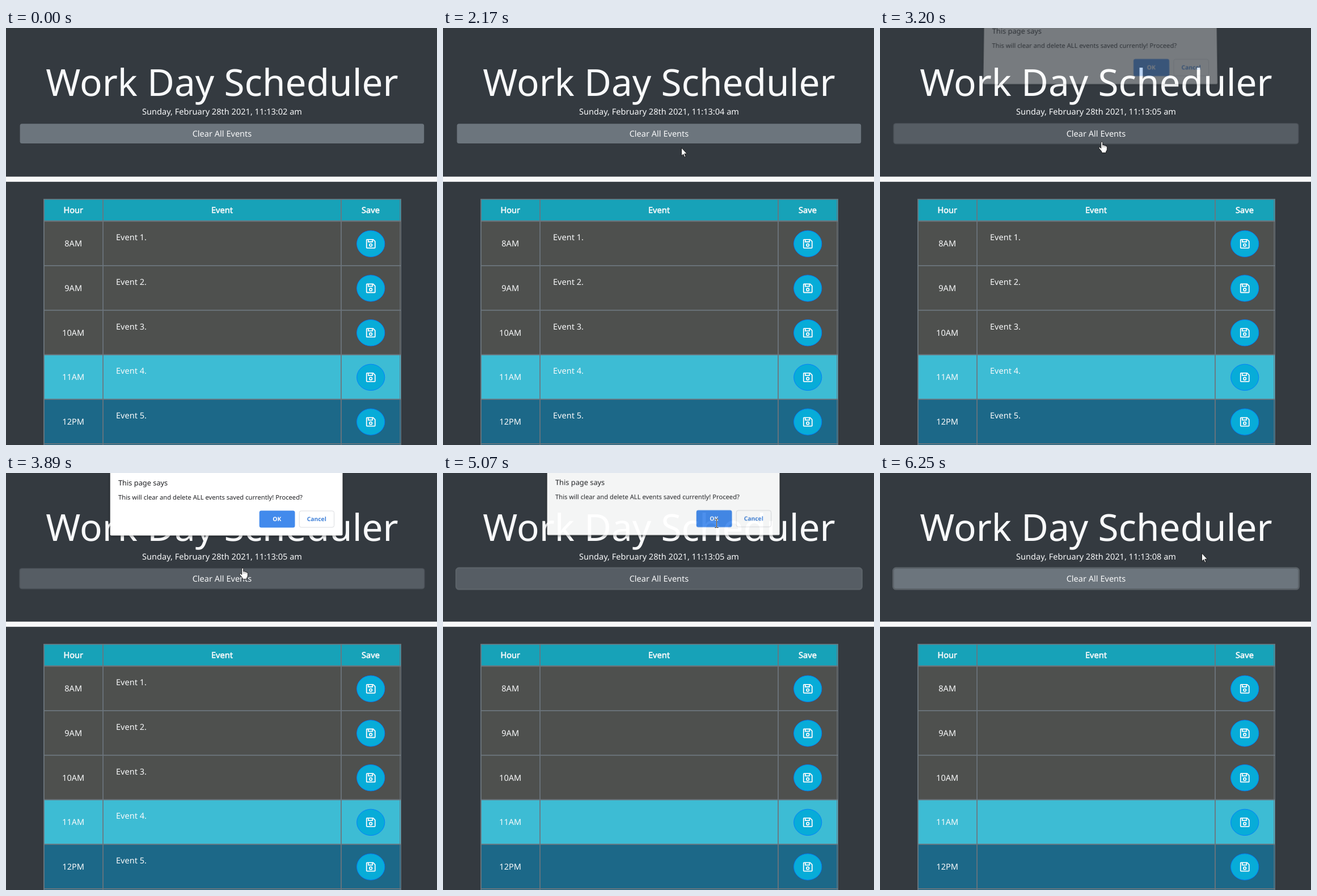
An HTML page that plays this animation: 760x737 px, repeating every 6330 ms.

```html
<!DOCTYPE html>
<html lang="en">
<head>
<meta charset="utf-8">
<title>Scheduler</title>
<style>
  html, body { margin: 0; width: 100%; height: 100%; overflow: hidden; background: #343a40; }
  #stage { position: absolute; inset: 0; overflow: hidden; background: #343a40; }
  svg { position: absolute; left: 0; top: 0; overflow: hidden; }
  text { font-family: "Noto Sans", "Open Sans", sans-serif; font-size: 14.57px; fill: #f8f9fa; text-rendering: geometricPrecision; }
  .mid { text-anchor: middle; }
  .head { stroke: #f8f9fa; stroke-width: .6px; }
  #dialog { transform-origin: 388.5px 0; filter: drop-shadow(0 1px 2px rgba(0, 0, 0, .5)); }
  #dialog text { fill: #202124; font-size: 11.2px; }
  #dialog .btn { font-size: 10.3px; font-weight: 600; text-anchor: middle; }
  #beam { mix-blend-mode: difference; }
</style>
</head>
<body>
<div id="stage">
<svg id="page" width="760" height="737">
  <text class="mid" x="381" y="119.8" style="font-size:65.7px">Work Day Scheduler</text>
  <text class="mid" id="clock" x="381" y="152.5"></text>
  <rect id="ring" fill="#5b6268"/>
  <rect id="clear" x="24.6" y="169.3" width="712.6" height="34.8" rx="3.6"/>
  <text class="mid" x="381" y="192.2">Clear All Events</text>
  <rect y="262.7" width="760" height="9.1" fill="#f8f9fa"/>
  <g id="table"></g>
</svg>

<svg id="dialog" width="760" height="150">
  <path d="M183.7 0H593.5V108.5Q593.5 110.5 591.5 110.5H185.7Q183.7 110.5 183.7 108.5Z" fill="#fff"/>
  <text x="198" y="21.8" style="font-size:12.8px">This page says</text>
  <text x="198" y="47.4">This will clear and delete ALL events saved currently! Proceed?</text>
  <rect x="446.7" y="66.4" width="62.8" height="30" rx="3.5" fill="#428aec"/>
  <text class="btn" x="477.8" y="85.2" style="fill:#fff">OK</text>
  <rect x="517.2" y="67" width="61.4" height="29" rx="3.5" fill="#fff" stroke="#dadce0"/>
  <text class="btn" x="547.8" y="85.2" style="fill:#3f80d8">Cancel</text>
</svg>

<svg id="arrow" width="12" height="19">
  <path d="M.5 .8V15L3.7 12L6 17.3L8 16.4L5.8 11.2H10.3Z" fill="#fff" stroke="#000" stroke-width=".8"/>
</svg>
<svg id="hand" width="17" height="22">
  <path d="M4.8 1.8Q6.2 0 7.7 1.8V7Q9.6 6.2 10.4 7.6Q12.2 7 13 8.4Q15.4 8.2 15.4 10.6V14.2Q15.4 16.6 13.6 18.2V20.6H6V18.6L1.2 12.6Q.3 10.6 2.4 10.6L4.8 12.6Z" fill="#fff" stroke="#000" stroke-width=".8"/>
  <path d="M7.8 7V11M10.4 8V11M13 9V11.4" stroke="#555" stroke-width=".6"/>
</svg>
<svg id="beam" width="7" height="16">
  <path d="M.5 .5H2.6L3.5 1.2L4.4 .5H6.5M3.5 1V15M.5 15.5H2.6L3.5 14.8L4.4 15.5H6.5" fill="none" stroke="#fff"/>
</svg>
</div>

<script>
const LOOP = 6330, FIRST = 770, STEP = 78.29;   // the picture moves in even steps
const ALERT = 3040, CONFIRM = 5070, CLOSED = 5140;
const $ = id => document.getElementById(id);
const clamp = v => Math.max(0, Math.min(1, v));

// table
const rect = (x, y, w, h, fill) =>
  `<rect x="${x}" y="${y}" width="${w}" height="${h}" fill="${fill}"/>`;
const label = (x, y, s, cls = 'mid') => `<text class="${cls}" x="${x}" y="${y}">${s}</text>`;
const cells = (y, h, fill) => rect(67.8, y, 102.4, h, fill) + rect(171.9, y, 418.2, h, fill)
  + rect(591.9, y, 102.3, h, fill) + rect(695, y, 1, h, fill);
const saveButton = y => `<g transform="translate(643.2 ${y})">
  <ellipse rx="24.6" ry="23.2" fill="#07acd8" stroke="#007bff" stroke-width=".9"/>
  <g fill="none" stroke="#f8f9fa" stroke-width="1.8">
    <path d="M-6.6 -7.5H4.2L7.6 -4.1V6.7Q7.6 7.5 6.8 7.5H-6.6Q-7.4 7.5 -7.4 6.7V-6.7Q-7.4 -7.5 -6.6 -7.5Z"/>
    <path d="M-4.3 -7V-3.3H3V-7"/><circle cy="2.3" r="2.3"/>
  </g></g>`;

function buildTable() {
  let table = rect(66, 301.9, 631, 436, '#6c757d') + cells(303.5, 36.6, '#17a2b8')
    + label(118.7, 327, 'Hour', 'mid head') + label(381, 327, 'Event', 'mid head')
    + label(643, 327, 'Save', 'mid head');
  let events = '';
  for (let i = 0; i < 6; i++) {
    const y = 342.3 + i * 78.7, hour = 8 + i;
    const fill = hour < 11 ? '#4e504e' : hour === 11 ? '#3dbcd4' : '#1c6888';
    table += cells(y, 76.9, fill) + saveButton(y + 39)
      + label(118.7, y + 44, hour < 12 ? hour + 'AM' : (hour - 12 || 12) + 'PM');
    events += label(194, y + 33, `Event ${i + 1}.`, '');
  }
  $('table').innerHTML = table + `<g id="events">${events}</g>`;
}

// pointer glides: start, end, goal
const GLIDES = [[770, 1400, 704, 294], [1400, 2170, 421, 211], [2170, 2500, 391, 201],
  [3697, 4520, 482, 89], [5460, 6250, 567, 141]];
const HOT = { arrow: [0, 0], hand: [6, 1], beam: [3.5, 8] };

function pointerAt(t) {
  let x = 728, y = 726;
  for (const [from, to, gx, gy] of GLIDES) {
    const p = 1 - (1 - clamp((t - from) / (to - from))) ** 1.2;
    x += (gx - x) * p;
    y += (gy - y) * p;
  }
  return [x, y];
}

function pointerKind(t, y) {
  if (t < FIRST) return '';
  if (t > CONFIRM && y < 140) return 'beam';
  return t < CONFIRM && y > 110 && y < 204 ? 'hand' : 'arrow';
}

function drawPointer(t) {
  const [x, y] = pointerAt(t), kind = pointerKind(t, y);
  for (const id in HOT) {
    const s = $(id).style, [hx, hy] = HOT[id];
    s.display = id === kind ? '' : 'none';
    s.left = Math.round(x - hx) + 'px';
    s.top = Math.round(y - hy) + 'px';
  }
}

function drawClock(t) {
  const shown = t >= ALERT && t < CLOSED ? ALERT : t;   // the alert holds the clock
  const second = 2 + Math.floor(Math.max(0, shown - 40) / 1000);
  $('clock').textContent = `Sunday, February 28th 2021, 11:13:0${second} am`;
}

function drawButton(t) {
  const pressed = t >= ALERT && t < CLOSED;
  const w = t < ALERT ? 0 : t < CONFIRM ? 1.4 : 2.7;
  const values = { x: 24.6 - w, y: 169.3 - w, width: 712.6 + 2 * w, height: 34.8 + 2 * w,
    rx: 3.6 + w, opacity: w / 2.7 };
  for (const k in values) $('ring').setAttribute(k, values[k]);
  $('clear').setAttribute('fill', pressed ? '#565d64' : '#6c757d');
}

function drawDialog(t) {
  const open = clamp((t - ALERT) / 300) * clamp(1 - (t - CONFIRM) / 190), away = 1 - open;
  const s = $('dialog').style;
  s.opacity = open ** 1.7;
  s.transform = away
    ? `translateY(${-25 * away}px) perspective(1000px) rotateX(${8 * away}deg)` : 'none';
}

function draw(time) {
  const n = Math.floor((time - FIRST + 14) / STEP);
  const t = n < 0 ? 0 : FIRST + n * STEP;
  drawClock(t);
  drawButton(t);
  drawDialog(t);
  drawPointer(t);
  $('events').style.display = t > CONFIRM ? 'none' : '';
}

buildTable();
const start = performance.now();
function tick() {
  draw((performance.now() - start) % LOOP);
  requestAnimationFrame(tick);
}
tick();
</script>
</body>
</html>
```
